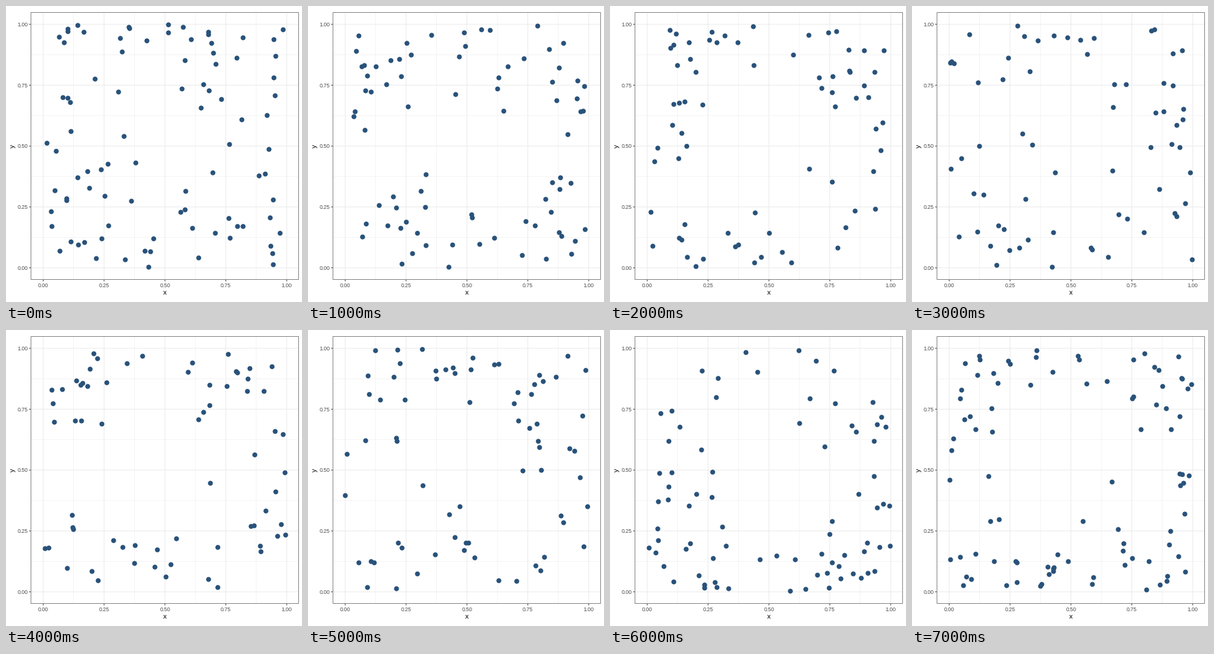
Animation of 480 by 480 pixels, one loop 8000 ms. Source, as a matplotlib script:

```python
import numpy as np
import matplotlib.pyplot as plt
from matplotlib.animation import FuncAnimation
from matplotlib.patches import Rectangle

SIZE, DPI = 480, 100
PX = 72 / DPI
STATES = 8
LEFT, BASE, SPAN = 60.3, 424.6, 394.9
X0, Y0, X1, Y1 = 40.5, 10.5, 474.5, 443.5
DOT, GRID, BORDER = "#29527a", "#ebebeb", "#7f7f7f"
TICK, LABEL = "#333333", "#4d4d4d"


def sample(state):
    """Uniform points, thinned out with the square of the distance to the centre."""
    rng = np.random.default_rng(40 + state)
    points = rng.random((400, 2))
    r = np.hypot(*(points - 0.5).T)
    kept = points[rng.random(len(r)) < (2 * r) ** 2]
    # The cloud thins out towards the middle of the loop.
    middle = (STATES - 1) / 2
    count = round(66 + 2 * (state - middle) ** 2)
    return kept[:count] * [SPAN, -SPAN] + [LEFT, BASE]


plt.rcParams["font.family"] = "Liberation Sans"
fig = plt.figure(figsize=(SIZE / DPI, SIZE / DPI), dpi=DPI, facecolor="white")
ax = fig.add_axes([0, 0, 1, 1])
ax.set(xlim=(0, SIZE), ylim=(SIZE, 0))
ax.axis("off")


def line(xs, ys, color, width):
    ax.plot(xs, ys, color=color, lw=width * PX, zorder=1,
            solid_capstyle="butt", snap=False)


def text(x, y, s, size, color, ha="center", va="baseline", **kw):
    ax.text(x, y, s, fontsize=size * PX, color=color, ha=ha, va=va, **kw)


for k in range(9):
    gx, gy = LEFT + SPAN * k / 8, BASE - SPAN * k / 8
    major = k % 2 == 0
    width = 1.07 if major else 0.53
    line([gx, gx], [Y0, Y1], GRID, width)
    line([X0, X1], [gy, gy], GRID, width)
    if major:
        name = f"{k / 8:.2f}"
        line([gx, gx], [Y1, Y1 + 3], TICK, 1)
        line([X0 - 3, X0], [gy, gy], TICK, 1)
        text(gx, 456.3, name, 8.8, LABEL)
        text(35.8, gy + 3.2, name, 8.8, LABEL, ha="right")

ax.add_patch(Rectangle((X0, Y0), X1 - X0, Y1 - Y0, fill=False, ec=BORDER,
                       lw=PX, zorder=4, snap=False))
text(257.4, 468, "x", 11, "black")
text(10.5, 227, "y", 11, "black", va="center", rotation=90)

dots = ax.scatter([], [], s=(8 * PX) ** 2, color=DOT, linewidths=0, zorder=3)


def draw(i):
    dots.set_offsets(sample(i))
    return [dots]


anim = FuncAnimation(fig, draw, frames=STATES, interval=1000,
                     repeat=True, repeat_delay=0, blit=False)
plt.show()
```
